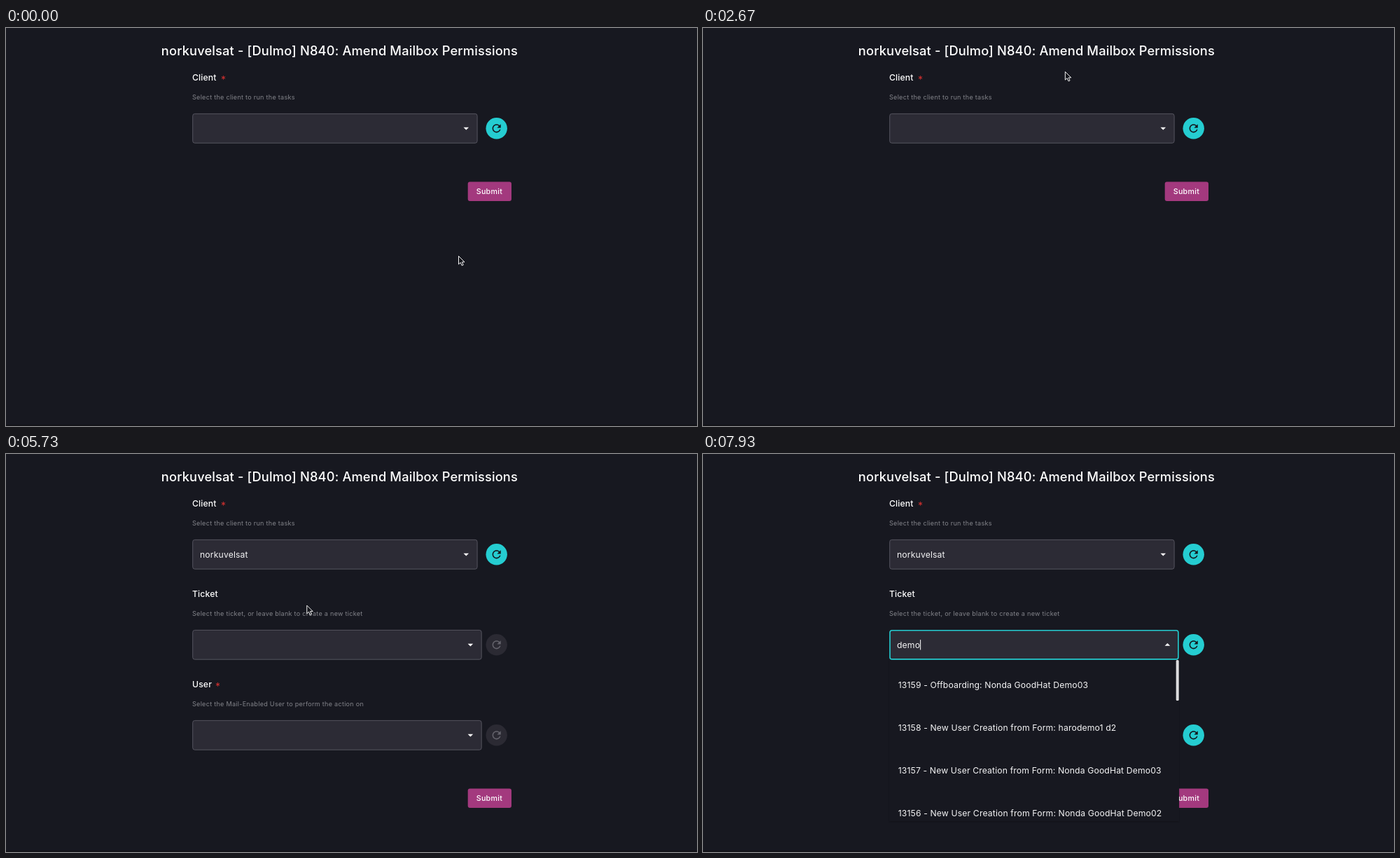
These frames come from a looping animation (987 by 568 pixels, 8000 ms). An HTML page:

```html
<!DOCTYPE html>
<html lang="en">
<head>
<meta charset="utf-8">
<title>Amend Mailbox Permissions</title>
<style>
  html, body { margin: 0; width: 100%; height: 100%; overflow: hidden; background: #171820; }
  svg { display: block; width: 987px; height: 568px; }
  text { font-family: Inter, "Open Sans", sans-serif; font-size: 12.2px; letter-spacing: .14px; fill: #f4f4f5; white-space: pre; }
  .title { font-size: 18.3px; font-weight: 500; letter-spacing: .14px; fill: #fff; }
  .label { font-weight: 500; fill: #fff; }
  .hint { font-size: 9.1px; letter-spacing: .26px; fill: #828389; }
  .star { font-size: 14px; fill: #d0302f; }
  .button { font-size: 10.7px; font-weight: 500; letter-spacing: .3px; fill: #fff; }
  .loading { fill: #a6a7ab; }
  .bold { font-weight: 700; }
  .paper { fill: #171820; filter: drop-shadow(0 1px 1px rgba(0, 0, 0, .25)); }
</style>
</head>
<body>
<svg id="stage" viewBox="0 0 987 568" xmlns="http://www.w3.org/2000/svg"></svg>
<script>
const stage = document.getElementById('stage');
const LOOP = 8000;
const TEAL = '#25cdd1';
const CLIENT = 'norkuvelsat';
const LEFT = 266.2;
const PITCH = 129;

const OPEN_CLIENT = 3070, PICK = 5400, OPEN_TICKET = 6470, LOADED = 7800;
const CLIENT_KEYS = [3730, 4000, 4200, 4470];
const TICKET_KEYS = [6870, 7070, 7300, 7530];

const COMPANIES = [
  ['#Holume', 186], ['A Paper Oak Company', 216.3], ['A Dulmoy Org', 246.6],
  ['A usuallyPaper Oak Company', 284.6], ['stonebucket', 322.6],
  ['Oren Shale Company Test', 360.6], ['Oren Coppertin', 398.6]
];
const TICKETS = [
  '13159 - Offboarding: Nonda GoodHat Demo03',
  '13158 - New User Creation from Form: harodemo1 d2',
  '13157 - New User Creation from Form: Nonda GoodHat Demo03',
  '13156 - New User Creation from Form: Nonda GoodHat Demo02'
];

// Pointer stops: time, x, y
const POINTER = [
  [0, 646, 325], [120, 646, 325], [360, 629, 290], [800, 625, 70], [930, 625, 68],
  [1730, 576, 33], [2250, 455, 34], [2600, 517, 50], [2900, 516, 134],
  [3000, 501, 143.5], [4850, 501, 143.5], [5200, 420, 186], [5450, 420, 187],
  [6130, 445, 264]
];

const ease = p => p * p * (3 - 2 * p);
const mix = (a, b, p) => a + (b - a) * p;

function pointerAt(t) {
  const next = POINTER.findIndex(stop => stop[0] > t);
  if (next < 0) return POINTER[POINTER.length - 1].slice(1);
  const [t0, x0, y0] = POINTER[next - 1], [t1, x1, y1] = POINTER[next];
  const p = ease((t - t0) / (t1 - t0));
  return [mix(x0, x1, p), mix(y0, y1, p)];
}

const text = (x, y, content, cls = '') => `<text x="${x}" y="${y}" class="${cls}">${content}</text>`;
const item = (content, middle, cls) => text(278.7, middle + 4.4, content, cls);
const paper = (top, bottom, right) =>
  `<rect class="paper" x="266" y="${top}" width="${right - 266}" height="${bottom - top}"/>`;
const scrollbar = (x, y, h) =>
  `<rect x="${x}" y="${y}" width="4" height="${h}" rx="1.5" fill="#dcdcde"/>`;

function heading(y, label, hint, starX) {
  return text(266, y + 4.4, label, 'label') +
    (starX ? text(starX, y + 7.7, '*', 'star') : '') + text(266, y + 31, hint, 'hint');
}

function field(y, right, { open, hover, value = '' }) {
  const border = open ? TEAL : hover ? '#fff' : '#55545f';
  const line = open ? 1.6 : 1;
  const turn = open ? ' rotate(180)' : '';
  return `<rect x="${LEFT + line / 2}" y="${y - 21.4 + line / 2}" width="${right - LEFT - line}" height="${42.8 - line}"
      rx="3" fill="#2c2b35" stroke="${border}" stroke-width="${line}"/>
    <path transform="translate(${right - 16.3} ${y}) scale(.76)${turn}" d="M-5-2L0 3 5-2z" fill="#fff"/>` +
    `<text x="277" y="${y + 4.4}" ${open ? 'id="typed"' : ''}>${value}</text>`;
}

function refresh(y, active) {
  return `<circle cx="700.7" cy="${y}" r="15.2" fill="${active ? TEAL : '#2b2a33'}"/>
    <path transform="translate(700.7 ${y}) scale(.76) translate(-12 -12)" fill="${active ? '#14151b' : '#64636c'}"
      d="M17.65 6.35C16.2 4.9 14.21 4 12 4c-4.42 0-7.99 3.58-7.99 8s3.57 8 7.99 8c3.73 0 6.84-2.55 7.73-6h-2.08c-.82 2.33-3.04 4-5.65 4-3.31 0-6-2.69-6-6s2.69-6 6-6c1.66 0 3.14.69 4.22 1.78L13 11h7V4z"/>`;
}

function submit(y) {
  return `<rect x="659.7" y="${y - 13.7}" width="62.3" height="27.4" rx="3" fill="#a3397e"/>` +
    text(671.7, y + 3.9, 'Submit', 'button');
}

function spinner(x, y, elapsed) {
  const p = elapsed / 1400 % 1;
  const grow = ease(Math.min(1, p * 2)), shrink = ease(Math.max(0, p * 2 - 1));
  const start = 15 * grow + 110 * shrink;
  const end = Math.min(127, start + mix(1, 100, grow));
  const point = units => {
    const angle = (units / 127 + p) * 2 * Math.PI;
    return `${x + 6.9 * Math.cos(angle)} ${y + 6.9 * Math.sin(angle)}`;
  };
  return `<path d="M${point(start)}A6.9 6.9 0 ${end - start > 63.5 ? 1 : 0} 1 ${point(end)}"
    fill="none" stroke="#fff" stroke-width="1.4"/>`;
}

function cursor(x, y, beam) {
  if (!beam) return `<path transform="translate(${x} ${y})" d="M.5.5V12.2L3.2 9.7 5.2 14 7.2 13.1 5.3 9H9z"
    fill="#15161c" stroke="#f2f2f2" stroke-width="1" stroke-linejoin="round"/>`;
  const d = 'M-2.5-6.3Q0-6.3 0-4.6Q0-6.3 2.5-6.3M0-4.6V4.6M-2.5 6.3Q0 6.3 0 4.6Q0 6.3 2.5 6.3M-1.5 1.5H1.5';
  return `<g transform="translate(${x} ${y})" fill="none" stroke-linecap="round">
    <path d="${d}" stroke="#f0f0f0" stroke-width="2.4"/><path d="${d}" stroke="#1b1b22" stroke-width=".9"/></g>`;
}

function clientMenu(typed) {
  if (typed) {
    const n = typed.length;
    return paper(165, 207.5, 673.5) + item(`<tspan class="bold">${CLIENT.slice(0, n)}</tspan>${CLIENT.slice(n)}`, 186);
  }
  return paper(165, 395.5, 673.5) +
    `<g clip-path="url(#menu)">${COMPANIES.map(([name, y]) => item(name, y)).join('')}</g>` +
    scrollbar(669.5, 165.5, 10.5);
}

function ticketMenu(loading) {
  if (loading) return paper(294, 333, 680) + item('Loading...', 313.4, 'loading');
  return paper(294, 524, 680) +
    TICKETS.map((name, i) => item(name, 330 + i * 60.7)).join('') + scrollbar(675.7, 294, 58);
}

function draw(t) {
  const clientOpen = t >= OPEN_CLIENT && t < PICK;
  const picked = t >= PICK;
  const ticketOpen = t >= OPEN_TICKET;
  const loaded = t >= LOADED;
  const keys = picked ? TICKET_KEYS : CLIENT_KEYS;
  const pressed = keys.filter(k => k <= t);
  const typed = (picked ? 'demo' : CLIENT).slice(0, pressed.length);
  const [px, py] = pointerAt(t);
  const over = y => px > LEFT && px < 673 && Math.abs(py - y) < 21;
  const clientY = 143.3, ticketY = clientY + PITCH, userY = ticketY + PITCH;

  let out = `<defs><clipPath id="menu"><path d="M267 165H673V395.5H267z"/></clipPath></defs>
    <path d="M0 0H987V568H0z" fill="#171820"/><path d="M0 566H987V568H0z" fill="#131319"/>
    <text x="476.4" y="39.3" class="title" text-anchor="middle">${CLIENT} - [Dulmo] N840: Amend Mailbox Permissions</text>`;
  out += heading(71, 'Client', 'Select the client to run the tasks', 307);
  out += field(clientY, 673.6, { open: clientOpen, hover: over(clientY), value: picked ? CLIENT : typed });
  out += refresh(clientY, true);

  if (picked) {
    out += heading(71 + PITCH, 'Ticket', 'Select the ticket, or leave blank to create a new ticket');
    out += field(ticketY, 679.7, { open: ticketOpen, hover: over(ticketY), value: typed });
    out += refresh(ticketY, loaded);
    out += heading(71 + 2 * PITCH, 'User', 'Select the Mail-Enabled User to perform the action on', 299);
    out += field(userY, 679.7, {});
    out += refresh(userY, loaded);
  }
  out += submit(picked ? 233.2 + 2 * PITCH : 233.2);

  if (clientOpen) out += clientMenu(typed);
  if (ticketOpen) {
    out += ticketMenu(!loaded);
    if (!loaded) out += spinner(642, ticketY - .3, t - OPEN_TICKET);
  }

  const hidden = t >= TICKET_KEYS[0] || (t >= CLIENT_KEYS[0] && t < 4900);
  if (!hidden) out += cursor(px, py, over(clientY) || (picked && over(ticketY)));
  stage.innerHTML = out;

  const input = document.getElementById('typed');
  const lastInput = pressed.length ? pressed[pressed.length - 1] : picked ? OPEN_TICKET : OPEN_CLIENT;
  if (input && Math.floor((t - lastInput) / 500) % 2 === 0) {
    const x = 277 + (typed ? input.getComputedTextLength() : 0);
    const y = (picked ? ticketY : clientY) - 7.2;
    input.insertAdjacentHTML('afterend', `<rect x="${x}" y="${y}" width="1" height="14.4" fill="#fff"/>`);
  }
}

const begin = performance.now();
function tick() {
  draw((performance.now() - begin) % LOOP);
  requestAnimationFrame(tick);
}
tick();
</script>
</body>
</html>
```
